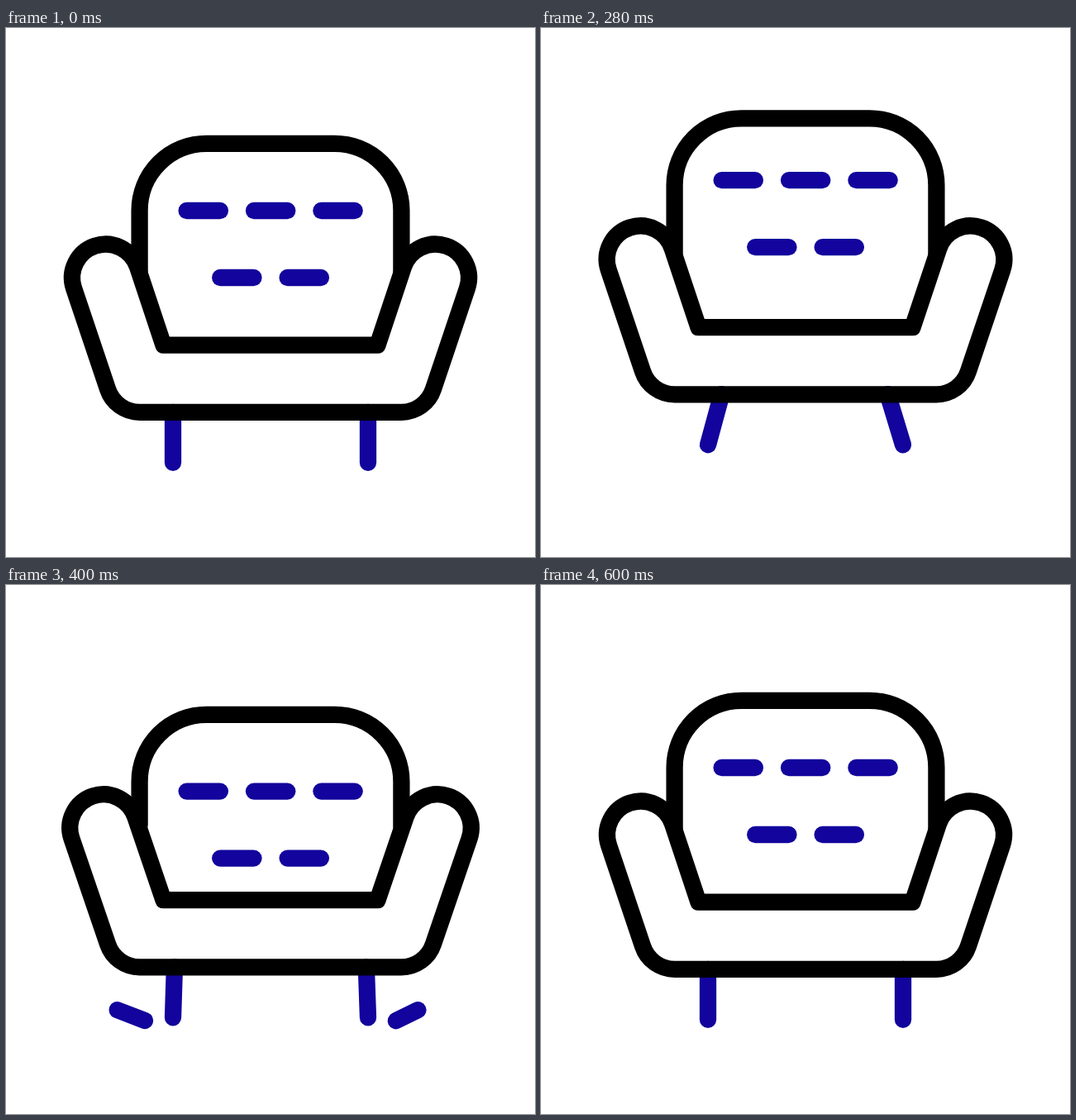
These frames come from a looping animation (640 by 640 pixels, 1.48 s). An HTML page with a canvas:

```html
<!DOCTYPE html>
<html>
<head>
<meta charset="utf-8">
<style>
html, body { margin: 0; height: 100%; overflow: hidden; background: #fff; }
canvas { display: block; width: 640px; height: 640px; }
</style>
</head>
<body>
<canvas id="stage" width="640" height="640"></canvas>
<script>
const ctx = document.getElementById('stage').getContext('2d');
const LOOP = 1480, STEP = 40;
const BLUE = '#12049c', BLACK = '#000';

// keys: [time, value] pairs, eased in between
const SEAT = [[120, 0], [240, -24], [440, 0]];
const BACK = [[120, 0], [240, -36.6], [280, -30.5], [320, -16.5], [360, -0.8], [400, 17], [440, 29.2], [600, 0]];
const DASH = [[120, 0], [240, -45.5], [440, 37.2], [600, 0]];
const ARM = [[240, 0], [440, 6.5], [600, 0]];
const BACK_END = [[240, 0], [360, -4], [440, 0], [520, -3], [600, 0]];
const HEAD = [[320, 0], [480, 1]];
const TAIL = [[400, 0], [560, 1]];

function at(keys, t) {
  if (t <= keys[0][0]) return keys[0][1];
  for (let i = 1; i < keys.length; i++) {
    const [t0, a] = keys[i - 1], [t1, b] = keys[i];
    if (t < t1) {
      const x = (t - t0) / (t1 - t0);
      return a + (b - a) * x * x * (3 - 2 * x);
    }
  }
  return keys[keys.length - 1][1];
}

function line(x0, y0, x1, y1) {
  ctx.beginPath();
  ctx.moveTo(x0, y0);
  ctx.lineTo(x1, y1);
  ctx.stroke();
}

function drawLegs(seat) {
  const foot = 525.8 + seat, top = 464.8 + seat;
  line(202, foot, 202 - seat * 0.77, top);
  line(438, foot, 438 + seat * 0.86, top);
}

function drawDashes(dy) {
  for (const x of [218.6, 300, 381.4]) line(x, 221 + dy, x + 40.3, 221 + dy);
  for (const x of [259.2, 340.6]) line(x, 302 + dy, x + 40.3, 302 + dy);
}

function drawPuff(x0, y0, x1, y1, tail, head) {
  if (head <= tail) return;
  const dx = x1 - x0, dy = y1 - y0;
  line(x0 + dx * tail, y0 + dy * tail, x0 + dx * head, y0 + dy * head);
}

function drawBack(dy, seat, leftEnd) {
  const l = 161.6, r = 478.4, top = 139.8 + dy, rad = 81;
  ctx.beginPath();
  ctx.moveTo(l, 295 + seat + leftEnd);
  ctx.lineTo(l, top + rad);
  ctx.arc(l + rad, top + rad, rad, Math.PI, Math.PI * 1.5);
  ctx.arc(r - rad, top + rad, rad, -Math.PI / 2, 0);
  ctx.lineTo(r, 295 + seat);
  ctx.stroke();
}

function drawSeat(dy, arm) {
  const rad = 40.6, tilt = Math.atan(1 / 3);
  const armX = 120.6 - arm * 0.46, armY = 302.2 - arm + dy;
  const footX = 161.6, footY = 424.2 + dy, seatY = 383.7 + dy;
  ctx.beginPath();
  ctx.arc(footX, footY, rad, Math.PI / 2, Math.PI - tilt);
  ctx.arc(armX, armY, rad, Math.PI - tilt, 2 * Math.PI - tilt);
  ctx.lineTo(190.5, seatY);
  ctx.lineTo(449.5, seatY);
  ctx.arc(640 - armX, armY, rad, Math.PI + tilt, 2 * Math.PI + tilt);
  ctx.arc(640 - footX, footY, rad, tilt, Math.PI / 2);
  ctx.closePath();
  ctx.stroke();
}

function draw(t) {
  const seat = at(SEAT, t), head = at(HEAD, t), tail = at(TAIL, t);
  ctx.fillStyle = '#fff';
  ctx.fillRect(0, 0, 640, 640);
  ctx.lineWidth = 20.3;
  ctx.lineCap = ctx.lineJoin = 'round';

  ctx.strokeStyle = BLUE;
  drawLegs(seat);
  drawDashes(at(DASH, t));
  drawPuff(168, 527, 101.2, 501.2, tail, head);
  drawPuff(471.8, 527.2, 525, 501.2, tail, head);

  ctx.strokeStyle = BLACK;
  drawBack(at(BACK, t), seat, at(BACK_END, t));
  drawSeat(seat, at(ARM, t));
}

const start = performance.now();
function tick() {
  const t = (performance.now() - start) % LOOP;
  draw(Math.floor(t / STEP) * STEP);
  requestAnimationFrame(tick);
}
tick();
</script>
</body>
</html>
```
